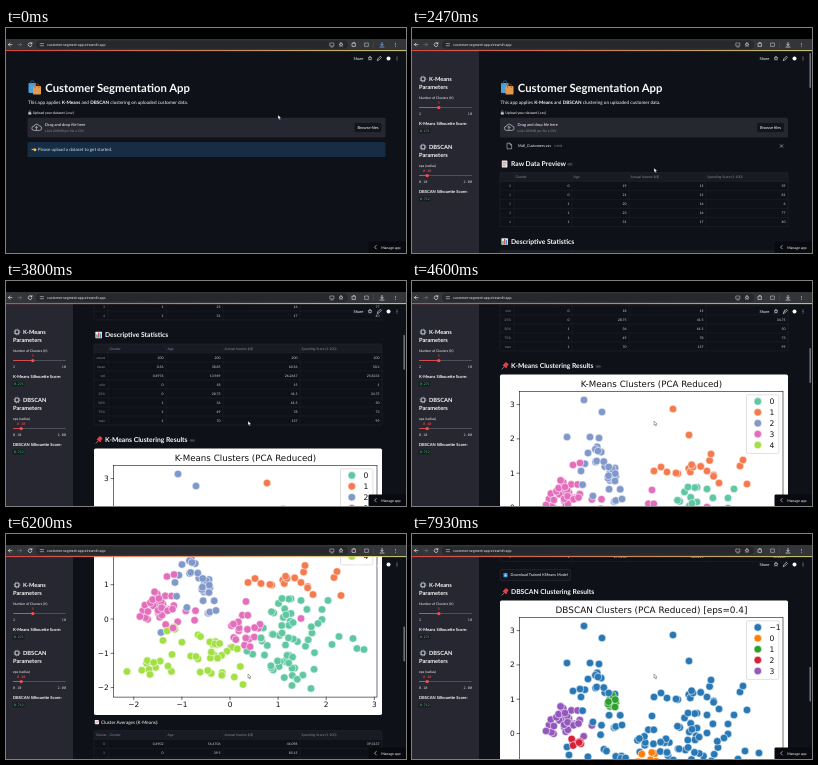
Write an HTML page that moves like this. It is 400x225 px and loops after 8000 ms.

```html
<!DOCTYPE html>
<html lang="en">
<head>
<meta charset="utf-8">
<title>Customer Segmentation App</title>
<style>
html, body { margin: 0; width: 100%; height: 100%; overflow: hidden; background: #000; }
svg { display: block; width: 100vw; height: 100vh; font-family: Lato, "Open Sans", sans-serif; text-rendering: geometricPrecision; }
.plot { font-family: "DejaVu Sans", sans-serif; }
.mono { font-family: "Noto Sans Mono", "DejaVu Sans Mono", monospace; }
.url { font-family: Roboto, Arial, sans-serif; }
</style>
</head>
<body>
<svg id="stage" viewBox="0 0 400 225"></svg>
<script>
const LOOP = 8000;
const BG = '#0e1117', PANEL = '#262730', INK = '#fafafa', DIM = '#8b8d95', RED = '#ff4b4b';

// Text is placed by its vertical middle.
const text = (s, x, y, size, fill = INK, extra = '') =>
  `<text x="${x}" y="${y + size * 0.35}" font-size="${size}" fill="${fill}" ${extra}>${s}</text>`;
const BOLD = 'font-weight="700"', MID = 'text-anchor="middle"', END = 'text-anchor="end"';
const rect = (x, y, w, h, fill, r = 0, extra = '') =>
  `<rect x="${x}" y="${y}" width="${w}" height="${h}" rx="${r}" fill="${fill}" ${extra}/>`;
const dot = (x, y, r, fill, extra = '') => `<circle cx="${x}" cy="${y}" r="${r}" fill="${fill}" ${extra}/>`;
const line = (d, color = INK, w = 0.6) =>
  `<path d="${d}" fill="none" stroke="${color}" stroke-width="${w}" stroke-linecap="round" stroke-linejoin="round"/>`;
const group = (body, id = '', extra = '') => `<g ${id && `id="${id}"`} ${extra}>${body}</g>`;

function random(seed) {
  return () => {
    seed = (seed * 1664525 + 1013904223) >>> 0;
    return seed / 4294967296;
  };
}

const star = (x, y, r) => {
  let d = '';
  for (let i = 0; i < 10; i++) {
    const a = i * Math.PI / 5 - Math.PI / 2, k = i % 2 ? r * 0.45 : r;
    d += `${i ? 'L' : 'M'}${(x + k * Math.cos(a)).toFixed(2)} ${(y + k * Math.sin(a)).toFixed(2)}`;
  }
  return line(d + 'Z', INK, 0.5);
};
const kebab = (x, y) => [-1.5, 0, 1.5].map(d => dot(x, y + d, 0.45, INK)).join('');
const anchor = (x, y, id) => group(line(
  `M${x + 2} ${y - 0.8}h-1a.8 .8 0 0 0 0 1.6h1M${x + 3} ${y - 0.8}h1a.8 .8 0 0 1 0 1.6h-1M${x + 1.6} ${y}h1.8`, '#777a82', 0.45), id);

function browser() {
  return rect(0, 0, 400, 11, '#000') + rect(0, 11, 400, 11.4, '#343538') +
    rect(30, 12.6, 312, 8.2, '#27282b', 4.1) +
    line('M6 16.6H2.4M4 15l-1.6 1.6L4 18.2') + line('M12 16.6h3.6M14 15l1.6 1.6L14 18.2', '#77797d') +
    line('M25.7 15.6a1.9 1.9 0 1 0 .2 1.6M25.9 14.4v1.4h-1.4') +
    line('M34.2 15.6h3.4M34.2 17.7h3.4', '#c7c9cc') +
    text('customer-segment-app.streamlit.app', 41, 16.7, 3.55, '#e6e7e9', 'class="url"') +
    line('M324.2 15h3.6v3h-3.6zM325 19h2', '#d4d5d8', 0.5) + star(335, 16.7, 2.1) +
    line('M346.4 15.2h3v3.2h-3zM347.4 14.6h1', '#d4d5d8', 0.7) +
    line('M359 15h3.4v3.4H359z', '#d4d5d8', 0.5) +
    rect(367.4, 13.5, 0.4, 6.4, '#55575b') +
    group(line('M376 14.4v3M374.7 16.2l1.3 1.3 1.3-1.3M374 19h4', 'currentColor', 0.7), 'saved') +
    kebab(389.5, 16.7) +
    rect(0, 22.2, 400, 0.9, 'url(#strip)');
}

function toolbar() {
  return text('Share', 347.5, 30.5, 4) + star(364, 30.4, 2.1) +
    line('M371.4 32.3l.4-1.5 2.5-2.5 1.1 1.1-2.5 2.5z', INK, 0.6) +
    dot(382.5, 30.5, 2, INK) + kebab(391, 30.5);
}

// Top of the page between the edges L and R.
function head(L, R) {
  return rect(L + 1, 55, 7.5, 10, '#4aa3d8', 0.8) + line(`M${L + 3} 56v-1.5a1.8 1.8 0 0 1 3.6 0V56`, '#2d6f9f', 0.7) +
    rect(L + 5.5, 58, 8, 8.5, '#e39a4a', 0.8) + line(`M${L + 7.6} 59.5v-1.7a1.9 1.9 0 0 1 3.8 0v1.7`, '#a8562c', 0.7) +
    text('Customer Segmentation App', L + 17.8, 60, 11.3, INK, BOLD) +
    text('This app applies <tspan font-weight="700">K-Means</tspan> and <tspan font-weight="700">DBSCAN</tspan> clustering on uploaded customer data.', L + 0.5, 74, 4.65) +
    rect(L + 0.8, 84.2, 3, 2.4, '#c9ccd2', 0.4) + line(`M${L + 1.5} 84v-.6a.8 .8 0 0 1 1.6 0v.6`, '#c9ccd2', 0.4) +
    text('Upload your dataset (.csv)', L + 5.2, 85.2, 3.65) +
    rect(L, 89.8, R - L, 19.8, PANEL, 1.6) +
    line(`M${L + 6.4} 102.4a2.1 2.1 0 0 1 .1-4.2a2.8 2.8 0 0 1 5.3-.2a2.2 2.2 0 0 1 .4 4.4zM${L + 9} 101.5v-3M${L + 7.9} 99.5l1.1-1.1l1.1 1.1`, '#d5d7dc', 0.65) +
    text('Drag and drop file here', L + 17.5, 96.6, 4) +
    text('Limit 200MB per file • CSV', L + 17.5, 103, 3.25, DIM) +
    rect(R - 31.2, 94.6, 27.4, 9.8, '#12151c', 1.4, 'stroke="#3b3d46" stroke-width=".3"') +
    text('Browse files', R - 17.5, 99.5, 4, INK, MID);
}

const fileRow = (L, R) =>
  line(`M${L + 7.4} 115.2h2.6l1.6 1.6v4h-4.2zM${L + 10} 115.2v1.6h1.6`, '#d5d7dc', 0.55) +
  text('Mall_Customers.csv', L + 18, 118, 3.8) + text('3.9KB', L + 54, 118.1, 3, DIM) +
  line(`M${R - 7.8} 116.7l2.6 2.6m0-2.6l-2.6 2.6`, '#d5d7dc', 0.55);

const info = () => rect(21.5, 114, 358, 15, '#172d43', 1.6) +
  line('M26 121.4h2.4M28 121.2l2 .2', '#f2b93b', 1) + dot(28.9, 121.9, 1.4, '#f2b93b') +
  text('Please upload a dataset to get started.', 31.8, 121.3, 4.45, '#c7e4f8');

function sidebar() {
  const gear = y => dot(11, y, 2, 'none', 'stroke="#aeb6c0" stroke-width="1.2"') +
    dot(11, y, 2.9, 'none', 'stroke="#aeb6c0" stroke-width=".8" stroke-dasharray="1.1 1.18"');
  const slider = (y, x, low, high, value) =>
    rect(7, y - 0.4, 53, 0.8, '#5b5d66', 0.4) + rect(7, y - 0.4, x - 7, 0.8, RED, 0.4) + dot(x, y, 1.7, RED) +
    text(value, x, y - 4.4, 3.5, RED, 'class="mono" ' + MID) +
    text(low, 7, y + 6, 3.5, '#d6d7da', 'class="mono"') + text(high, 60, y + 6, 3.5, '#d6d7da', 'class="mono" ' + END);
  const part = (y, name, label, control, score) =>
    gear(y) + text(name, 17, y, 5.7, INK, BOLD) + text('Parameters', 7, y + 8.3, 5.7, INK, BOLD) +
    text(label, 7, y + 18.8, 3.45) + control +
    text(name + ' Silhouette Score:', 7, y + 45, 4.1, INK, BOLD) +
    rect(6.8, y + 49.4, 11.6, 5.2, '#1a1c24', 0.8) + text(score, 8, y + 52, 3.2, '#3dd56d', 'class="mono"');
  return rect(0, 22, 67, 203, PANEL) +
    part(51, 'K-Means', 'Number of Clusters (K)', slider(79.6, 26.8, '2', '10', '5'), '0.271') +
    part(119, 'DBSCAN', 'eps (radius)', slider(147.6, 15.2, '0.10', '2.00', '0.40'), '0.712');
}

const COLS = ['Gender', 'Age', 'Annual Income (k$)', 'Spending Score (1-100)'];
const EDGES = [102, 160, 217, 294, 376];

// y is the middle of the header row.
function table(y, first, rows) {
  const h = 9 * (rows.length + 1), top = y - 4.6;
  let s = rect(88, top, 288, h, BG, 1.2) + rect(88, top, 288, 9, '#181b23', 1.2) + text(first, 90, y, 3.4, DIM);
  COLS.forEach((c, i) => s += text(c, EDGES[i] + 1.6, y, 3.4, DIM));
  rows.forEach((row, i) => row.forEach((v, j) => {
    s += text(v, j ? EDGES[j] - 2.6 : 99, y + 9 * (i + 1), 3.4, j ? '#d9dade' : DIM, END);
  }));
  let d = '';
  for (let i = 1; i <= rows.length; i++) d += `M88 ${top + 9 * i}H376`;
  EDGES.slice(0, 4).forEach(x => d += `M${x} ${top}v${h}`);
  return s + line(d, '#262932', 0.35) + rect(88, top, 288, h, 'none', 1.2, 'stroke="#2c2f38" stroke-width=".4"');
}

const heading = (s, y, icon) => icon + text(s, 99, y, 6.75, INK, BOLD);
const pageIcon = y => rect(89.8, y - 3.4, 5.6, 6.8, '#e8eaee', 0.5) +
  line(`M91 ${y - 1.6}h3M91 ${y}h3M91 ${y + 1.6}h2`, '#d2555f', 0.6);
const chartIcon = (x, y) => rect(x, y - 3.3, 6.6, 6.6, '#e8eaee', 0.5) +
  rect(x + 0.9, y - 0.6, 1.3, 3.3, '#43a45b') + rect(x + 2.7, y - 2.5, 1.3, 5.2, '#d9484f') + rect(x + 4.5, y - 1.4, 1.3, 4.1, '#3c86cf');
const pinIcon = y => line(`M90 ${y + 3.2}l2.3-2.4`, '#c3c7cf', 0.6) +
  `<path d="M90.6 ${y - 0.6}l4 3 .4-2 1.7-2.2-2.8-2.3-1.7 1.9z" fill="#e2404d"/>`;

const K_COLORS = ['#5fc7a1', '#f57a4e', '#8198cb', '#e36fbc', '#a3e046'];
const D_COLORS = { '-1': '#2878b5', 0: '#ff7f0e', 1: '#2ca02c', 2: '#d62238', 3: '#9458bd' };

function makePoints() {
  const marked = [
    [322, 142, 316, 151, 276, 140, 295, 142, 285, 155, 316, 161, 347, 180, 333, 178, 326, 186, 351, 190, 358, 191, 286, 227, 305, 230],
    [261, 62, 277, 88, 299, 107, 331, 113, 328, 119, 335, 137, 307, 136, 255, 125, 242, 124, 249, 120, 264, 126, 281, 120, 295, 124],
    [172, 53, 190, 65, 155, 90, 178, 90, 187, 91, 176, 106, 186, 104, 203, 121, 169, 124, 198, 126, 196, 131, 203, 134, 210, 152, 155, 174],
    [161, 118, 168, 116, 153, 140, 134, 158, 137, 152, 240, 143, 225, 189, 295, 160],
    [121, 213, 143, 211, 144, 216, 157, 182, 166, 196, 207, 186, 190, 198, 237, 226]
  ];
  // cluster, centre, radii, count
  const blobs = [
    [2, 188, 112, 18, 14, 9], [2, 190, 142, 20, 20, 9], [2, 200, 130, 5, 8, 5],
    [1, 270, 121, 28, 7, 5], [1, 300, 120, 8, 10, 3],
    [0, 285, 160, 32, 20, 19], [0, 275, 192, 36, 18, 22], [0, 286, 212, 26, 12, 11],
    [3, 153, 148, 21, 16, 22], [3, 178, 160, 28, 11, 9], [3, 240, 172, 17, 20, 19],
    [4, 164, 173, 6, 7, 6], [4, 200, 190, 28, 15, 12], [4, 150, 205, 20, 13, 8], [4, 218, 206, 28, 18, 13]
  ];
  const rnd = random(20), pts = [];
  const add = (k, x, y) => pts.push({ k, x, y, z: rnd() });
  marked.forEach((m, k) => { for (let i = 0; i < m.length; i += 2) add(k, m[i], m[i + 1]); });
  blobs.forEach(([k, cx, cy, rx, ry, n]) => {
    while (n--) {
      const a = rnd() * 2 * Math.PI, r = Math.sqrt(rnd());
      add(k, +(cx + rx * r * Math.cos(a)).toFixed(1), +(cy + ry * r * Math.sin(a)).toFixed(1));
    }
  });
  return pts.sort((a, b) => a.z - b.z);
}

const inside = (p, cx, cy, rx, ry) => ((p.x - cx) / rx) ** 2 + ((p.y - cy) / ry) ** 2 < 1;
function density(p) {
  if (inside(p, 200, 130, 7, 9)) return 1;
  if (inside(p, 164, 173, 8, 9)) return 2;
  if (p.k === 3 && inside(p, 156, 149, 27, 18)) return 3;
  if (inside(p, 240, 187, 17, 9)) return 0;
  return -1;
}

function chart(title, size, pts, pick, colors, keys, dy) {
  const ring = 'stroke="#fff" stroke-width=".55"';
  let s = rect(88, 27.6, 288, 228.8, '#fff', 1.6) + text(title, 239.5, 37.2, size, '#111', MID);
  pts.forEach(p => s += dot(p.x, p.y, 3.8, colors[pick(p)], ring));
  let ticks = '';
  const num = v => v < 0 ? '−' + -v : v;
  for (let v = -2; v <= 3; v++) {
    const x = 224 + 48.1 * v, y = +(160.5 - 34.3 * v).toFixed(1);
    ticks += `M${x} 238.6v2.6M107.6 ${y}h-2.6`;
    s += text(num(v), x, 245.8, 7.4, '#111', MID) + text(num(v), 102.6, y, 7.4, '#111', END);
  }
  s += line(ticks, '#111', 0.6) + rect(107.6, 44.6, 263.4, 194, 'none', 0, 'stroke="#111" stroke-width=".6"');
  s += rect(334.5, 47.8, 32.4, 58.6, '#fff', 1.4, 'stroke="#ccc" stroke-width=".6" fill-opacity=".85"');
  keys.forEach((k, i) => {
    const y = 54.4 + 10.9 * i;
    s += dot(345.8, y, 3.8, colors[k], ring) + text(num(k), 357.5, y, 7.6, '#111');
  });
  return group(s, '', `class="plot" transform="translate(0 ${dy})"`);
}

function results() {
  const pts = makePoints();
  return head(88, 376) + fileRow(88, 376) +
    heading('Raw Data Preview', 136, pageIcon(136)) + anchor(155.5, 136.3, 'a0') +
    table(149, '', [[0, 0, 19, 15, 39], [1, 0, 21, 15, 81], [2, 1, 20, 16, 6], [3, 1, 23, 16, 77], [4, 1, 31, 17, 40]]) +
    heading('Descriptive Statistics', 213.5, chartIcon(89.4, 213.5)) + anchor(164.5, 213.8, 'a1') +
    table(227, '', [
      ['count', 200, 200, 200, 200], ['mean', 0.56, 38.85, 60.56, 50.2],
      ['std', 0.4976, 13.969, 26.2647, 25.8235], ['min', 0, 18, 15, 1],
      ['25%', 0, 28.75, 41.5, 34.75], ['50%', 1, 36, 61.5, 50], ['75%', 1, 49, 78, 73], ['max', 1, 70, 137, 99]]) +
    heading('K-Means Clustering Results', 318.5, pinIcon(318.5)) + anchor(183.8, 319, 'a2') +
    chart('K-Means Clusters (PCA Reduced)', 8.7, pts, p => p.k, K_COLORS, [0, 1, 2, 3, 4], 299.5) +
    rect(88.8, 561, 4.2, 4.2, '#e8eaee', 0.4) + line('M89.4 564.2l1.2-1.4 .8 .6 1.2-1.7', '#d9484f', 0.5) +
    text('Cluster Averages (K-Means):', 95, 563.2, 4.65) +
    table(576, 'Cluster', [
      [0, 0.4902, 56.4706, 46.098, 39.3137], [1, 0, 39.5, 85.15, 14.05],
      [2, 0.4231, 28.6923, 60.9038, 70.2404], [3, 1, 37.8974, 82.1282, 54.4468], [4, 1, 27.3158, 38.8421, 56.2206]]) +
    rect(88.2, 633.6, 70.4, 11, '#12151c', 1.4, 'stroke="#3b3d46" stroke-width=".4"') +
    rect(91.4, 637, 4.2, 4.2, '#3b88d8', 0.5) + line('M93.5 637.9v2.2M92.6 639.3l.9 1 .9-1', '#fff', 0.5) +
    text('Download Trained KMeans Model', 98.6, 639.1, 3.85) +
    heading('DBSCAN Clustering Results', 656, pinIcon(656)) +
    chart('DBSCAN Clusters (PCA Reduced) [eps=0.4]', 8.9, pts, density, D_COLORS, [-1, 0, 1, 2, 3], 637);
}

const stage = document.getElementById('stage');
stage.innerHTML =
  `<defs><linearGradient id="strip"><stop offset="0" stop-color="${RED}"/><stop offset="1" stop-color="#e9e880"/></linearGradient></defs>` +
  rect(0, 0, 400, 225, BG) +
  group(head(21.5, 379.5) + group(fileRow(21.5, 379.5), 'file') + group(info(), 'info'), 'start') +
  group(group(results(), 'page') + sidebar() + rect(397.4, 25, 1.6, 35, '#6d7078', 0.8, 'id="thumb"'), 'loaded') +
  toolbar() +
  rect(362.5, 213.4, 38, 12, '#080a0f', 1.4) +
  line('M370.2 217.5l-1.6 1.7 1.6 1.7') + text('Manage app', 375.3, 219.3, 3.6) +
  browser() +
  '<path id="cursor" d="M0 0v4.2l1-.9 .7 1.6 .8-.4-.7-1.5h1.3z" fill="#fff" stroke="#222" stroke-width=".35"/>';

const el = {};
stage.querySelectorAll('[id]').forEach(n => el[n.id] = n);
const show = (id, on) => el[id].setAttribute('display', on ? 'inline' : 'none');
const move = (id, x, y) => el[id].setAttribute('transform', `translate(${x.toFixed(2)} ${y.toFixed(2)})`);

// Eased interpolation through [time, value] stops.
function track(stops, t) {
  if (t <= stops[0][0]) return stops[0][1];
  for (let i = 1; i < stops.length; i++) {
    const [t0, a] = stops[i - 1], [t1, b] = stops[i];
    if (t < t1) {
      const u = (t - t0) / (t1 - t0);
      return a + (b - a) * u * u * (3 - 2 * u);
    }
  }
  return stops[stops.length - 1][1];
}

const SCROLL = [[2600, 0], [2930, 77], [3250, 77], [3900, 165], [4500, 233.5], [4780, 233.5],
  [5300, 299.5], [5780, 299.5], [6190, 375], [6400, 375], [6950, 490], [7600, 598]];
const CURSOR_X = [[850, 272], [1700, 242]], CURSOR_Y = [[850, 87], [1700, 140]];
const FILE_AT = 450, LOADED_AT = 1330;

function draw(t) {
  const loaded = t >= LOADED_AT, filed = t >= FILE_AT, y = track(SCROLL, t);
  show('start', !loaded);
  show('loaded', loaded);
  show('file', filed);
  move('info', 0, filed ? 14 : 0);
  move('page', 0, -y);
  move('thumb', 0, y * 0.18);
  move('cursor', track(CURSOR_X, t), track(CURSOR_Y, t));
  show('a0', t >= 1700 && t < 2700);
  show('a1', t >= 2700 && t < 3700);
  show('a2', t >= 3700 && t < 5100);
  el.saved.setAttribute('color', loaded ? '#e6e7e9' : '#7fb2f5');
}

const t0 = performance.now();
function tick() {
  draw((performance.now() - t0) % LOOP);
  requestAnimationFrame(tick);
}
draw(0);
requestAnimationFrame(tick);
</script>
</body>
</html>
```
